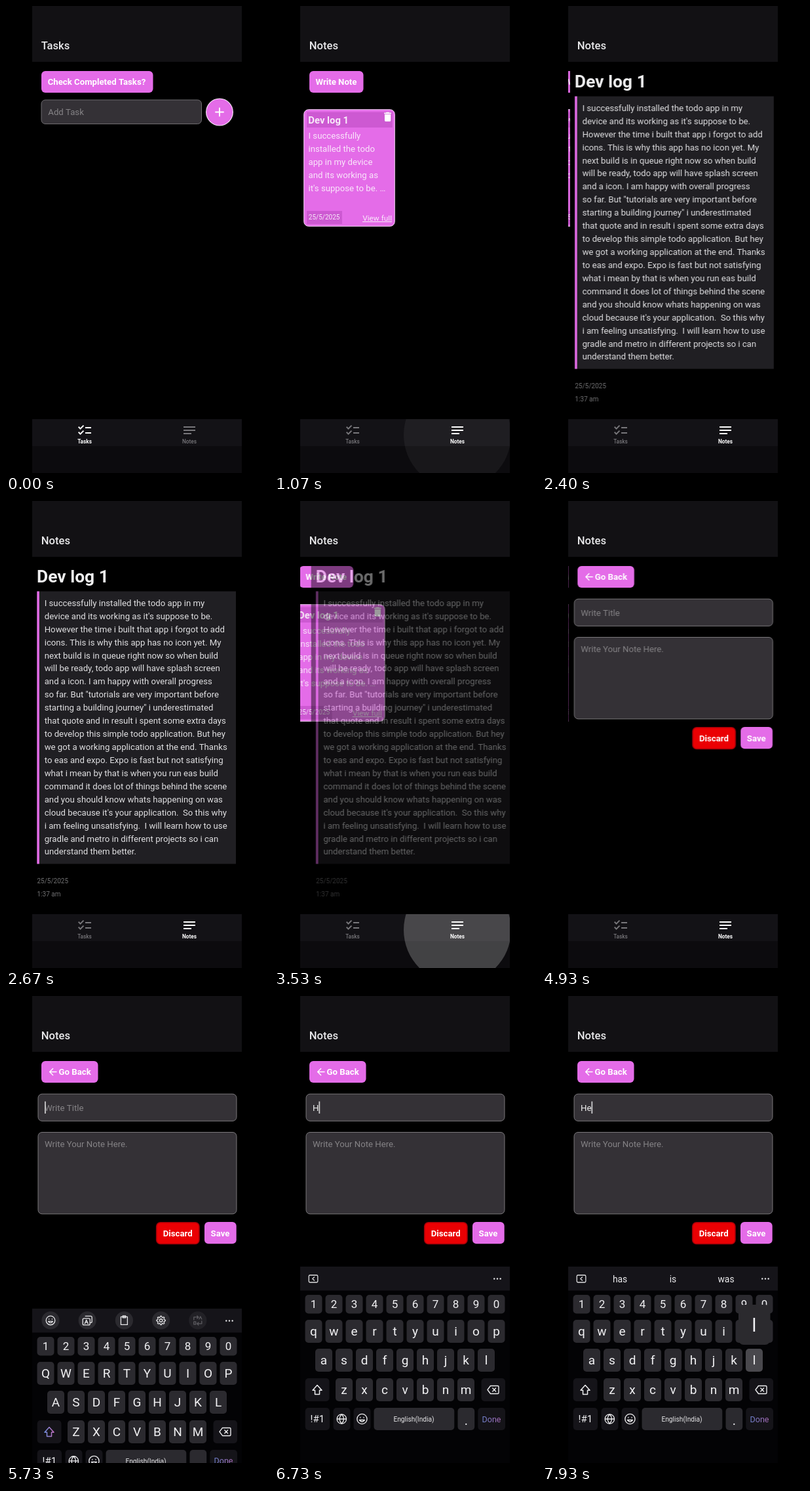
Animation, 400 px wide and 711 px high, one loop 8000 ms. Source, as an HTML page with a canvas:

```html
<!DOCTYPE html>
<html lang="en">
<head>
<meta charset="utf-8">
<title>Tasks and notes app</title>
<style>
html, body { margin: 0; width: 100%; height: 100%; overflow: hidden; background: #000; }
canvas { display: block; width: 400px; height: 711px; }
</style>
</head>
<body>
<canvas id="stage"></canvas>
<script>
const W = 400, H = 711, LOOP = 8000;
const PINK = '#e46ce8', FIELD = '#343136', MUTED = '#858386', KEY = '#2b2a2f', DARK_KEY = '#151419';
const scale = window.devicePixelRatio || 1;
const stage = document.getElementById('stage');
const buffer = document.createElement('canvas');
for (const c of [stage, buffer]) { c.width = W * scale; c.height = H * scale; }
const main = stage.getContext('2d'), layer = buffer.getContext('2d');
let g = main;

// Moments of the story, in ms
const T = {
  tabPress: 270, tabSwitch: 470, openNote: 2220, backPress: 3270, closeNote: 3450,
  openEditor: 4590, focus: 5470, keyboard: 5530,
  hDown: 6490, hUp: 6600, eDown: 6830, eUp: 6900, suggest: 7330, lDown: 7870
};

const NOTE = [
  'I successfully installed the todo app in my', "device and its working as it's suppose to be.",
  'However the time i built that app i forgot to add', 'icons. This is why this app has no icon yet. My',
  'next build is in queue right now so when build', 'will be ready, todo app will have splash screen',
  'and a icon. I am happy with overall progress', 'so far. But "tutorials are very important before',
  'starting a building journey" i underestimated', 'that quote and in result i spent some extra days',
  'to develop this simple todo application. But hey', 'we got a working application at the end. Thanks',
  'to eas and expo. Expo is fast but not satisfying', 'what i mean by that is when you run eas build',
  'command it does lot of things behind the scene', 'and you should know whats happening on was',
  "cloud because it's your application.  So this why", 'i am feeling unsatisfying.  I will learn how to use',
  'gradle and metro in different projects so i can', 'understand them better.'
];
const EXCERPT = ['I successfully', 'installed the todo', 'app in my device', 'and its working as', "it's suppose to be. …"];

const ICONS = {
  tasks: new Path2D('M22 7h-9v2h9V7zm0 8h-9v2h9v-2zM5.54 11 2 7.46l1.41-1.41 2.12 2.12 4.24-4.24 1.41 1.41L5.54 11zm0 8L2 15.46l1.41-1.41 2.12 2.12 4.24-4.24 1.41 1.41L5.54 19z'),
  notes: new Path2D('M3 6h18v2H3zM3 11h18v2H3zM3 16h12v2H3z'),
  trash: new Path2D('M6 19c0 1.1.9 2 2 2h8c1.1 0 2-.9 2-2V7H6zM19 4h-3.5l-1-1h-5l-1 1H5v2h14z')
};

const clamp = x => Math.max(0, Math.min(1, x));
const ramp = (t, start, length) => clamp((t - start) / length);
const easeOut = x => 1 - (1 - x) ** 3;
const bezier = (p, s) => p[0] * (1 - s) ** 3 + 3 * p[1] * s * (1 - s) ** 2 + 3 * p[2] * s * s * (1 - s) + p[3] * s ** 3;

// Two-part curve: quick start, very slow finish
function glide(x) {
  const [xs, ys] = x < 1 / 6
    ? [[0, 0.05, 0.1333, 1 / 6], [0, 0, 0.06, 0.4]]
    : [[1 / 6, 0.2083, 0.25, 1], [0.4, 0.82, 1, 1]];
  let lo = 0, hi = 1;
  for (let i = 0; i < 24; i++) {
    const mid = (lo + hi) / 2;
    if (bezier(xs, mid) < x) lo = mid; else hi = mid;
  }
  return bezier(ys, lo);
}

function text(str, x, y, size, color, weight = 400, align = 'left') {
  g.font = `${weight} ${size}px Roboto, sans-serif`;
  g.fillStyle = color;
  g.textAlign = align;
  g.fillText(str, x, y);
}

function rect(x0, y0, x1, y1, fill) {
  g.fillStyle = fill;
  g.fillRect(x0, y0, x1 - x0, y1 - y0);
}

function box(x0, y0, x1, y1, r, fill, border, width = 1) {
  g.beginPath();
  g.roundRect(x0, y0, x1 - x0, y1 - y0, r);
  if (fill) { g.fillStyle = fill; g.fill(); }
  if (border) { g.strokeStyle = border; g.lineWidth = width; g.stroke(); }
}

function disc(x, y, r, fill) {
  g.beginPath();
  g.arc(x, y, r, 0, 7);
  g.fillStyle = fill;
  g.fill();
}

// Strokes an SVG path whose origin sits at x, y
function strokeAt(x, y, d, color, width = 1.4) {
  g.save();
  g.translate(x, y);
  g.strokeStyle = color;
  g.lineWidth = width;
  g.lineJoin = g.lineCap = 'round';
  g.stroke(new Path2D(d));
  g.restore();
}

function icon(path, x, y, size, color) {
  g.save();
  g.translate(x, y);
  g.scale(size / 24, size / 24);
  g.fillStyle = color;
  g.fill(path);
  g.restore();
}

const circlePath = (x, y, r) => `M${x - r} ${y}a${r} ${r} 0 1 0 ${2 * r} 0a${r} ${r} 0 1 0 ${-2 * r} 0`;

function drawTasks() {
  box(54, 99, 224.5, 132, 6, PINK);
  text('Check Completed Tasks?', 63.7, 120.2, 13.2, '#fff', 700);
  box(54, 143, 298.5, 179.5, 6, FIELD, '#6f6d70');
  text('Add Task', 64.3, 166.2, 13.2, MUTED);
  disc(326, 161.5, 21, '#f6e6f6');
  disc(326, 161.5, 19.9, PINK);
  strokeAt(326, 161.5, 'M-6 0H6M0-6V6', '#fff', 1.9);
}

function drawList() {
  box(54, 99, 136.5, 132, 6, PINK);
  text('Write Note', 63.5, 120.2, 13.2, '#fff', 700);
  box(45.7, 157.7, 184.3, 335.3, 7, PINK, '#f4d3f5');
  rect(50, 161.5, 181, 185, '#cd59d2');
  text('Dev log 1', 52.3, 178.5, 14.85, '#f8e9f9', 700);
  icon(ICONS.trash, 164.3, 159.5, 18.6, '#fff');
  EXCERPT.forEach((line, i) => text(line, 52.5, 202.3 + i * 19.93, 13.2, '#f9e6fa'));
  rect(50, 312, 104, 332, '#cd59d2');
  text('25/5/2025', 52.8, 325.4, 10, '#f8e9f9');
  text('View full', 180, 326.6, 11.8, '#f9e9fa', 400, 'right');
  rect(135, 328, 180, 329, '#f9e9fa');
}

function drawNote() {
  text('Dev log 1', 47, 124, 26.4, '#efeff0', 700);
  rect(47.5, 137.5, 351, 552.5, '#201f23');
  rect(47.3, 137.5, 50.8, 552.5, PINK);
  NOTE.forEach((line, i) => text(line, 58.7, 159.8 + i * 19.93, 13.2, '#e0e0e2'));
  text('25/5/2025', 47.5, 582, 10, '#707072');
  text('1:37 am', 47.5, 602.4, 10, '#707072');
}

function drawEditor(t) {
  box(54, 99, 140.5, 132, 6, PINK);
  strokeAt(66, 115.5, 'M11 0H.8M5.6-5L.6 0L5.6 5', '#fff');
  text('Go Back', 80.6, 120.2, 13.2, '#fff', 700);
  box(49, 149.2, 352, 190.3, 6, FIELD, '#7a787b');
  box(49, 207.5, 352, 331.8, 6, FIELD, '#7a787b');
  text('Write Your Note Here.', 59, 230.2, 13.2, MUTED);
  box(229.7, 344.7, 295, 377.5, 6, '#ea0003', '#a30008', 1.6);
  text('Discard', 262.2, 365.6, 13.2, '#fff', 700, 'center');
  box(303, 344, 351.7, 377.3, 6, PINK);
  text('Save', 327, 365.6, 13.2, '#fff', 700, 'center');

  const typed = t >= T.eUp ? 'He' : t >= T.hUp ? 'H' : '';
  text(typed || 'Write Title', 59, 174.9, 13.2, typed ? '#f0f0f0' : MUTED);
  const since = [T.eUp, T.hUp, T.focus].find(m => t >= m);
  if (since !== undefined && (t - since) % 1000 < 500) {
    const x = 59 + (typed ? g.measureText(typed).width : 0);
    rect(x, 160.5, x + 1.8, 179, '#c9c9ca');
  }
}

// Draws a whole screen as one sheet so that it fades evenly
function sheet(draw, dx, alpha, t) {
  if (alpha <= 0) return;
  layer.setTransform(scale, 0, 0, scale, 0, 0);
  layer.clearRect(0, 0, W, H);
  g = layer;
  rect(40, 85, 360, 629, '#000');
  draw(t);
  g = main;
  g.globalAlpha = alpha;
  g.drawImage(buffer, dx, 0, W, H);
  g.globalAlpha = 1;
}

function push(under, over, t, start) {
  const p = glide(ramp(t, start, 450));
  sheet(under, -32 * p, 1, t);
  sheet(over, 32 * (1 - p), ramp(t, start + 50, 83), t);
}

function pop(under, over, t, start) {
  const p = glide(ramp(t, start, 450));
  sheet(under, -32 * (1 - p), 1, t);
  sheet(over, 32 * p, 1 - ramp(t, start + 35, 83), t);
}

function drawContent(t) {
  g.save();
  g.beginPath();
  g.rect(40, 85, 320, 544);
  g.clip();
  if (t < T.tabSwitch) drawTasks();
  else if (t < T.openNote) drawList();
  else if (t < T.closeNote) push(drawList, drawNote, t, T.openNote);
  else if (t < T.openEditor) pop(drawList, drawNote, t, T.closeNote);
  else push(drawList, drawEditor, t, T.openEditor);
  g.restore();
}

function ripple(t, start, rest) {
  const age = t - start;
  if (age < 0) return;
  const alpha = rest + (0.225 * ramp(age, 0, 75) - rest) * (1 - ramp(age, 330, 270));
  disc(280, 653, 82 * (0.35 + 0.65 * easeOut(ramp(age, 0, 225))), `rgba(255,255,255,${alpha})`);
}

function drawTabs(t) {
  rect(40, 629, 360, 670, '#131216');
  rect(40, 670, 360, 711, '#0c0b0e');
  g.save();
  g.beginPath();
  g.rect(40, 629, 320, 82);
  g.clip();
  if (t < T.openNote) ripple(t, T.tabPress, 0.05);
  else ripple(t, T.backPress, 0);
  g.restore();
  const onNotes = t >= T.tabSwitch;
  const tab = (path, label, x, active) => {
    const color = active ? '#fff' : '#77767a';
    icon(path, x - 12, 634, 24, color);
    text(label, x, 666, 8.25, color, active ? 700 : 500, 'center');
  };
  tab(ICONS.tasks, 'Tasks', 120, !onNotes);
  tab(ICONS.notes, 'Notes', 280, onNotes);
}

function drawHeader(t) {
  rect(40, 0, 360, 85, '#121114');
  text(t < T.tabSwitch ? 'Tasks' : 'Notes', 53.8, 66, 16.6, '#e8e8ea', 500);
}

function gearPath() {
  let d = '';
  for (let i = 0; i < 64; i++) {
    const a = i * Math.PI / 32, r = 5.8 + 0.9 * Math.tanh(2.5 * Math.cos(8 * a));
    d += `${i ? 'L' : 'M'}${(r * Math.cos(a)).toFixed(2)} ${(r * Math.sin(a)).toFixed(2)}`;
  }
  return d + 'Z' + circlePath(0, 0, 2.2);
}

const SMILE = circlePath(0, 0, 6.8) + 'M-3.5 1.5Q0 6 3.5 1.5ZM-2.4-2.3v.4M2.4-2.3v.4';
const TOOLS = [
  SMILE,
  'M-3-6.5H5Q7-6.5 7-4.5V1.5Q7 3.5 5 3.5M-5-3H2Q4-3 4-1V5Q4 7 2 7H-5Q-7 7-7 5V-1Q-7-3-5-3ZM-4 5L-1.5-.8L1 5M-3 3H0',
  'M-5-5.5H5V6.5H-5ZM-2.2-7H2.2V-4H-2.2Z',
  gearPath(),
  'M-6-1V-5H1M-1-7L1-5L-1-3M6 1V5H-1M1 3L-1 5L1 7M2-2L4-6L6-2M-6 6V2H-3V6Z'
];

function drawToolbar(t) {
  rect(40, 412, 360, 448.5, '#151419');
  for (const x of [336.3, 341, 345.7]) disc(x, 430.5, 1.2, '#e4e4e6');
  if (t < T.hUp) {
    TOOLS.forEach((d, i) => {
      const x = 68 + 56.2 * i;
      disc(x, 430, 13.6, i === 4 ? '#222126' : '#2b2a2f');
      strokeAt(x, 430, d, i === 4 ? '#5d5c61' : '#e6e6e8', 1.3);
    });
    return;
  }
  strokeAt(60, 430.5, 'M-5-5.5H5Q6.8-5.5 6.8-3.7V3.7Q6.8 5.5 5 5.5H-5Q-6.8 5.5-6.8 3.7V-3.7Q-6.8-5.5-5-5.5ZM1.5-2.5L-1.3 0L1.5 2.5', '#dedee0', 1.3);
  if (t >= T.suggest)
    ['has', 'is', 'was'].forEach((word, i) => text(word, 119 + 81 * i, 435.5, 13.8, '#ececee', 400, 'center'));
}

function drawKeyboard(t) {
  const lift = easeOut(ramp(t, T.keyboard, 500));
  if (lift <= 0) return;
  g.save();
  g.beginPath();
  g.rect(40, 0, 320, H);
  g.clip();
  g.translate(0, 299 * (1 - lift));
  rect(40, 412, 360, 711, '#030305');
  drawToolbar(t);

  const upper = t < T.hUp;
  const pressed = t >= T.lDown ? 'l'
    : t >= T.eDown && t < T.eUp + 60 ? 'e'
    : t >= T.hDown && t < T.hUp + 60 ? 'h' : '';
  let popup = null;
  const row = (chars, first, top, height, size) => [...chars].forEach((ch, i) => {
    const x = first + 31 * i;
    const label = upper ? ch.toUpperCase() : ch;
    if (ch === pressed) popup = { x, top, label };
    box(x - 13, top, x + 13, top + height, 5, ch === pressed ? '#49484d' : KEY);
    text(label, x, top + height / 2 + size * 0.34, size, '#f2f2f4', 400, 'center');
  });
  row('1234567890', 60.5, 455, 28.5, 17);
  row('qwertyuiop', 60.5, 493, 35, 19);
  row('asdfghjkl', 76, 537, 35, 19);
  row('zxcvbnm', 107, 582, 35, 19);

  const tint = (x0, x1, a, b) => {
    const grad = g.createLinearGradient(x0, 0, x1, 0);
    grad.addColorStop(0, a);
    grad.addColorStop(1, b);
    return grad;
  };
  box(47.7, 582, 84.5, 617, 5, DARK_KEY);
  strokeAt(66, 600, 'M0-7.5L7 .2H3.5V6.5H-3.5V.2H-7Z', upper ? tint(-7, 7, '#6f8fe0', '#c46fc0') : '#ececee', 1.5);
  box(316.5, 582, 353, 617, 5, DARK_KEY);
  strokeAt(334.5, 599.5, 'M-4-6H7Q8.5-6 8.5-4.5V4.5Q8.5 6 7 6H-4L-8.5 0ZM-.7-2.4L4.1 2.4M4.1-2.4L-.7 2.4', '#ececee');

  box(47.7, 627, 85, 661, 5, DARK_KEY);
  text('!#1', 66.3, 649.2, 15, '#f2f2f4', 400, 'center');
  box(90.5, 627, 116.5, 661, 5, DARK_KEY);
  strokeAt(103.3, 644, circlePath(0, 0, 7.2) + 'M-7 0H7M0-7.2Q-6.4 0 0 7.2M0-7.2Q6.4 0 0 7.2', '#ececee', 1.3);
  box(121.5, 627, 147.5, 661, 5, DARK_KEY);
  strokeAt(134.4, 644, circlePath(0, 0, 7.6) + 'M-4 1.5Q0 7 4 1.5ZM-2.6-2.5v.5M2.6-2.5v.5', '#ececee');
  box(152.5, 627, 275.3, 661, 5, KEY);
  text('English(India)', 213.5, 647.6, 10.2, '#e6e6e8', 400, 'center');
  box(280.5, 627, 306.2, 661, 5, KEY);
  text('.', 293.3, 652.5, 20, '#f2f2f4', 400, 'center');
  box(311.3, 627, 353, 661, 5, DARK_KEY);
  text('Done', 332, 648.5, 12.6, tint(317, 347, '#6a7fc8', '#a868b4'), 400, 'center');

  if (popup) {
    const { x, top, label } = popup;
    box(x - 24, top - 67, x + 24.5, top - 6, 8, '#2b2a2e');
    text(label, x, top - 26.5, 28, '#f4f4f6', 400, 'center');
  }
  g.restore();
}

function frame(now) {
  const t = now % LOOP;
  g = main;
  g.setTransform(scale, 0, 0, scale, 0, 0);
  rect(0, 0, W, H, '#000');
  drawHeader(t);
  drawContent(t);
  drawTabs(t);
  drawKeyboard(t);
}

const begin = performance.now();
function tick() {
  frame(performance.now() - begin);
  requestAnimationFrame(tick);
}
tick();
</script>
</body>
</html>
```
